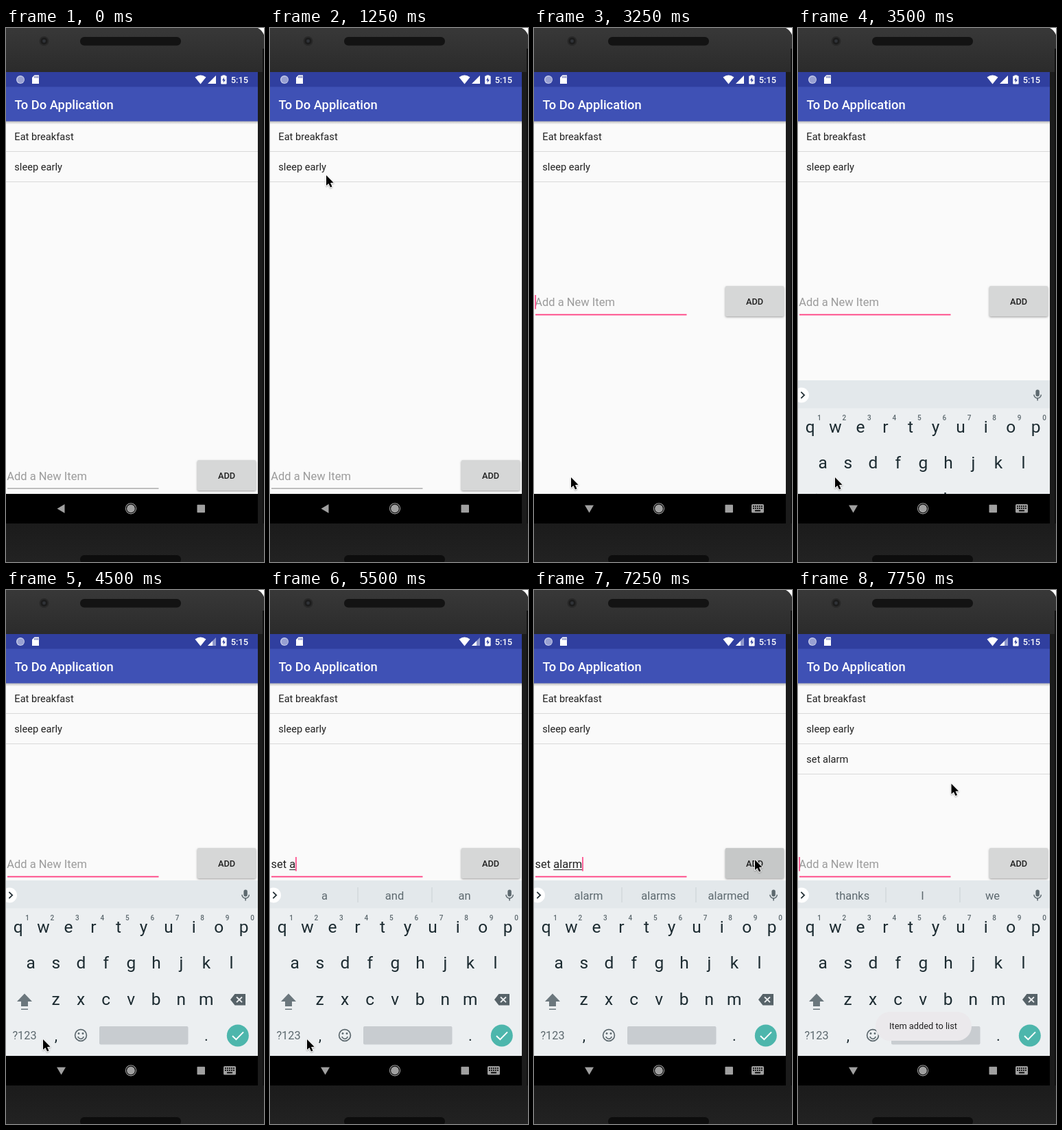
Recreate the animation shown at these times as an HTML page with a canvas. Size 376x776 px, loop 8 s.

```html
<!DOCTYPE html>
<html lang="en">
<head>
<meta charset="utf-8">
<title>To-do list</title>
<style>
html, body { margin: 0; width: 100%; height: 100%; overflow: hidden; background: #222; }
canvas { display: block; width: 100%; height: 100%; }
</style>
</head>
<body>
<canvas id="stage"></canvas>
<script>
const W = 376, H = 776, LOOP = 8000, STEP = 250;
const SCREEN_W = 367;
const PINK = '#ff4081', INK = '#212121', KEY_INK = '#1c2b31', KEY_GREY = '#5d696f';
const canvas = document.getElementById('stage');
const ctx = canvas.getContext('2d');
const ratio = window.devicePixelRatio || 1;
canvas.width = W * ratio;
canvas.height = H * ratio;

// Each entry holds from its time until the next one.
const pointerTrack = [
  [500, 172, 97], [750, 156, 116], [1000, 122, 160], [1250, 82, 214], [1500, 59, 239],
  [1750, 80, 372], [2000, 69, 560], [2250, 59, 661], [3000, 54, 653],
  [6250, 205, 592], [6500, 323, 538], [6750, 326, 450], [7000, 322, 392], [7750, 223.5, 281.5]
];
const typing = [
  [0, ''], [5000, 's'], [5250, 'set'], [5500, 'set a'], [5750, 'set ala'], [6000, 'set alarm'], [7500, '']
];
const suggestions = [
  [0, []], [5000, ['so', 'she', 'sorry']], [5250, ['set', 'sets', 'setting']],
  [5500, ['a', 'and', 'an']], [5750, ['ala', 'alarm', 'alas']],
  [6000, ['alarm', 'alarms', 'alarmed']], [7500, ['thanks', 'I', 'we']]
];

const valueAt = (track, t) => track.filter(e => e[0] <= t).pop();

function rect(x, y, w, h, color) {
  ctx.fillStyle = color;
  ctx.fillRect(x, y, w, h);
}

function round(x, y, w, h, r, color) {
  ctx.fillStyle = color;
  ctx.beginPath();
  ctx.roundRect(x, y, w, h, r);
  ctx.fill();
}

function disc(x, y, r, color) {
  ctx.fillStyle = color;
  ctx.beginPath();
  ctx.arc(x, y, r, 0, Math.PI * 2);
  ctx.fill();
}

function ring(x, y, r, color, width) {
  ctx.strokeStyle = color;
  ctx.lineWidth = width;
  ctx.beginPath();
  ctx.arc(x, y, r, 0, Math.PI * 2);
  ctx.stroke();
}

function poly(points, color) {
  ctx.fillStyle = color;
  ctx.beginPath();
  points.forEach(([x, y]) => ctx.lineTo(x, y));
  ctx.closePath();
  ctx.fill();
}

function line(points, color, width) {
  ctx.strokeStyle = color;
  ctx.lineWidth = width;
  ctx.beginPath();
  points.forEach(([x, y]) => ctx.lineTo(x, y));
  ctx.stroke();
}

function text(str, x, y, size, color, align = 'left', weight = 400) {
  ctx.font = `${weight} ${size}px Roboto, sans-serif`;
  ctx.textAlign = align;
  ctx.fillStyle = color;
  ctx.fillText(str, x, y);
  return ctx.measureText(str).width;
}

function gradient(y0, y1, ...colors) {
  const g = ctx.createLinearGradient(0, y0, 0, y1);
  colors.forEach((c, i) => g.addColorStop(i / (colors.length - 1), c));
  return g;
}

function drawPhone() {
  rect(0, 0, W, H, gradient(0, H, '#353535', '#252525', '#202020', '#1d1d1d', '#202020'));
  rect(0, 0, W, 64, gradient(0, 64, '#383838', '#2b2b2b'));
  rect(SCREEN_W, 64, W - SCREEN_W, 656, '#1b1b1b');
  rect(374, 30, 2, H - 30, '#101010');
  rect(0, 720, W, 56, gradient(720, H, '#1b1b1b', '#222222'));
  ctx.fillStyle = '#fff';
  ctx.beginPath();
  ctx.moveTo(367, 0);
  ctx.quadraticCurveTo(373, 3, W, 10);
  ctx.lineTo(W, 0);
  ctx.fill();
  disc(55.5, 19, 7, '#292929');
  disc(55.5, 19, 5, '#1c1c1c');
  disc(55.5, 19, 2.4, '#303338');
  round(108, 13, 147, 12.5, 6, '#131313');
  round(108, 766, 147, 12.5, 6, '#0d0d0d');
}

function drawStatus(weakSignal) {
  rect(0, 64, SCREEN_W, 22, '#303f9f');
  disc(21, 75, 6, '#c5cae9');
  disc(21.3, 75.2, 4.8, '#98a0d2');
  poly([[41.5, 68.5], [48, 68.5], [48, 81], [38, 81], [38, 72]], '#fff');
  [41.5, 43.7, 45.9].forEach(x => rect(x, 70, 1, 2.6, '#303f9f'));

  ctx.fillStyle = '#fff';
  ctx.beginPath();
  ctx.moveTo(275.5, 71.5);
  ctx.quadraticCurveTo(283.5, 65.5, 291.5, 71.5);
  ctx.lineTo(283.5, 81.5);
  ctx.fill();

  const full = [[306, 69], [306, 81], [294, 81]];
  poly(full, weakSignal ? '#8f98cc' : '#fff');
  if (weakSignal) poly([[301, 74], [301, 81], [294, 81]], '#fff');

  rect(315.5, 68.5, 4, 2, '#fff');
  round(313.2, 69.6, 8.4, 12, 1, '#fff');
  poly([[318, 71.5], [315, 76.3], [317, 76.3], [316.7, 79.8], [319.8, 75], [317.8, 75]], '#303f9f');
  text('5:15', 353, 80, 12.8, '#fff', 'right', 500);
}

function drawAppBar() {
  rect(0, 135, SCREEN_W, 5, gradient(135, 140, 'rgba(0,0,0,.28)', 'rgba(0,0,0,0)'));
  rect(0, 85.5, SCREEN_W, 50, '#3f51b5');
  text('To Do Application', 12.5, 118, 18.35, '#fff', 'left', 500);
}

function drawList(items) {
  items.forEach((item, i) => {
    const y = 136 + i * 44;
    text(item, 12.3, y + 27, 14.67, INK);
    rect(0, y + 43, SCREEN_W, 1, '#d9d9d9');
  });
}

function drawField(dy, value, focused, caret) {
  const base = 657 + dy;
  let end = 0;
  if (value) {
    end = text(value, 1.5, base, 16.5, INK);
    const start = value.startsWith('set ') ? ctx.measureText('set ').width : 0;
    rect(1.5 + start, base + 2, end - start, 1, INK);
  } else {
    text('Add a New Item', 1.2, base, 16.5, '#9b9b9b');
  }
  if (focused) rect(2, 668.7 + dy, 220.5, 1.8, PINK);
  else rect(2, 668.6 + dy, 220.5, 1, '#858585');
  if (caret) rect(1.4 + end, 641 + dy, 1.6, 20.5, PINK);
}

function drawButton(dy, pressed) {
  ctx.save();
  ctx.shadowColor = 'rgba(0,0,0,.35)';
  ctx.shadowBlur = 3 * ratio;
  ctx.shadowOffsetY = 1.2 * ratio;
  round(278.8, 628 + dy, 85.4, 44, 2, pressed ? '#c6c8c8' : '#d6d7d7');
  ctx.restore();
  text('ADD', 321.5, 654.6 + dy, 12.8, INK, 'center', 500);
}

function drawKeys() {
  const pitch = 36.55;
  const row = (letters, x, base) => [...letters].forEach((c, i) => text(c, x + i * pitch, base, 24.5, KEY_INK, 'center'));
  row('qwertyuiop', 17.8, 497.5);
  row('asdfghjkl', 36.2, 550);
  row('zxcvbnm', 72.5, 603);
  [...'1234567890'].forEach((c, i) => text(c, 31 + i * 36.45, 479.5, 10, KEY_GREY, 'center', 500));

  poly([[27, 586.5], [38, 598], [32, 598], [32, 605], [22, 605], [22, 598], [16, 598]], '#6b777d');
  rect(22, 608.5, 10, 1.5, '#6b777d');
  poly([[333.5, 587], [349, 587], [349, 603.5], [333.5, 603.5], [327, 595.3]], '#566268');
  line([[336, 591.5], [344, 599.2]], '#eceff1', 1.8);
  line([[344, 591.5], [336, 599.2]], '#eceff1', 1.8);

  text('?123', 27, 653, 16.3, KEY_GREY, 'center');
  text(',', 73, 655, 22, KEY_INK, 'center');
  text('.', 292, 655, 22, KEY_INK, 'center');
  ring(109, 647, 8.4, KEY_GREY, 1.7);
  disc(106, 644.5, 1.4, KEY_GREY);
  disc(112, 644.5, 1.4, KEY_GREY);
  ctx.beginPath();
  ctx.arc(109, 647.8, 4.4, 0.3, Math.PI - 0.3);
  ctx.stroke();
  round(136, 634, 129.5, 26.5, 2, '#c8ccd0');
  disc(337.8, 647.5, 16, '#4db6ac');
  line([[330, 648], [335.4, 653.2], [346, 642.4]], '#fff', 2);
}

function drawStrip(words) {
  rect(0, 422, SCREEN_W, 40.5, '#e3e8eb');
  disc(5, 443.5, 11, '#fff');
  line([[4.4, 438.8], [9.2, 443.5], [4.4, 448.2]], '#263238', 1.8);
  words.forEach((word, i) => text(word, 79.5 + i * 102, 450, 16.5, KEY_GREY, 'center'));
  if (words.length) [127.5, 235.5].forEach(x => rect(x, 432, 1, 22, '#c9d0d4'));
  round(346.4, 435.5, 5.4, 10, 2.7, KEY_GREY);
  ctx.strokeStyle = KEY_GREY;
  ctx.lineWidth = 1.5;
  ctx.beginPath();
  ctx.arc(349.1, 442.8, 5.2, 0, Math.PI);
  ctx.stroke();
  rect(348.3, 448, 1.6, 3.5, KEY_GREY);
}

function drawKeyboard(slide, words) {
  ctx.save();
  ctx.beginPath();
  ctx.rect(0, 422, SCREEN_W, 255);
  ctx.clip();
  ctx.translate(0, slide);
  rect(0, 422, SCREEN_W, 255, '#eceff1');
  drawStrip(words);
  drawKeys();
  ctx.restore();
}

function drawNav(keyboardOpen) {
  const grey = '#a0a0a0';
  rect(0, 677, SCREEN_W, 43, '#000');
  poly(keyboardOpen
    ? [[74, 693.5], [87, 693.5], [80.5, 704.5]]
    : [[85.5, 692], [85.5, 705], [74.5, 698.5]], grey);
  ring(182, 698.3, 7.6, grey, 1.1);
  disc(182, 698.3, 5.9, grey);
  round(278.5, 692.7, 11.5, 11.5, 0.8, grey);
  if (!keyboardOpen) return;
  round(317, 692, 18, 12.5, 1.5, grey);
  for (let r = 0; r < 2; r++) {
    for (let i = 0; i < 5; i++) rect(319 + i * 3, 694 + r * 3, 1.8, 1.8, '#000');
  }
  rect(322, 700.5, 8, 1.8, '#000');
}

function drawToast() {
  round(113, 613, 140, 42, 21, '#ebe9ec');
  text('Item added to list', 182.5, 638.3, 12.8, INK, 'center');
}

function drawPointer(x, y) {
  const shape = [[0, 0], [0, 15], [3.4, 11.9], [6, 17.6], [8.5, 16.5], [6, 11], [10.6, 10.8]];
  ctx.save();
  ctx.translate(x, y);
  ctx.lineJoin = 'round';
  ctx.shadowColor = 'rgba(0,0,0,.3)';
  ctx.shadowBlur = 2 * ratio;
  ctx.shadowOffsetY = ratio;
  line([...shape, shape[0]], '#fff', 1.8);
  ctx.restore();
  poly(shape.map(([px, py]) => [x + px, y + py]), '#000');
}

function caretOn(t) {
  const reset = [2750, 5500, 7500].some(s => t >= s && t < s + 500);
  return t >= 2750 && (reset || t % 1000 < 500);
}

function draw(t) {
  ctx.setTransform(ratio, 0, 0, ratio, 0, 0);
  const focused = t >= 2750, raised = t >= 3000, added = t >= 7500;
  const dy = raised ? -253 : 0;
  drawPhone();
  rect(0, 64, SCREEN_W, 613, '#fafafa');
  drawStatus(t >= 4500);
  drawAppBar();
  drawList(['Eat breakfast', 'sleep early'].concat(added ? 'set alarm' : []));
  drawField(dy, valueAt(typing, t)[1], focused, caretOn(t));
  drawButton(dy, t === 7250);
  if (t >= 3500) drawKeyboard(t < 3750 ? 90 : 0, valueAt(suggestions, t)[1]);
  if (t >= 7750) drawToast();
  drawNav(raised);
  const pointer = valueAt(pointerTrack, t);
  if (pointer) drawPointer(pointer[1], pointer[2]);
}

const start = performance.now();
function tick() {
  const t = (performance.now() - start) % LOOP;
  draw(Math.floor(t / STEP) * STEP);
  requestAnimationFrame(tick);
}
tick();
</script>
</body>
</html>
```
